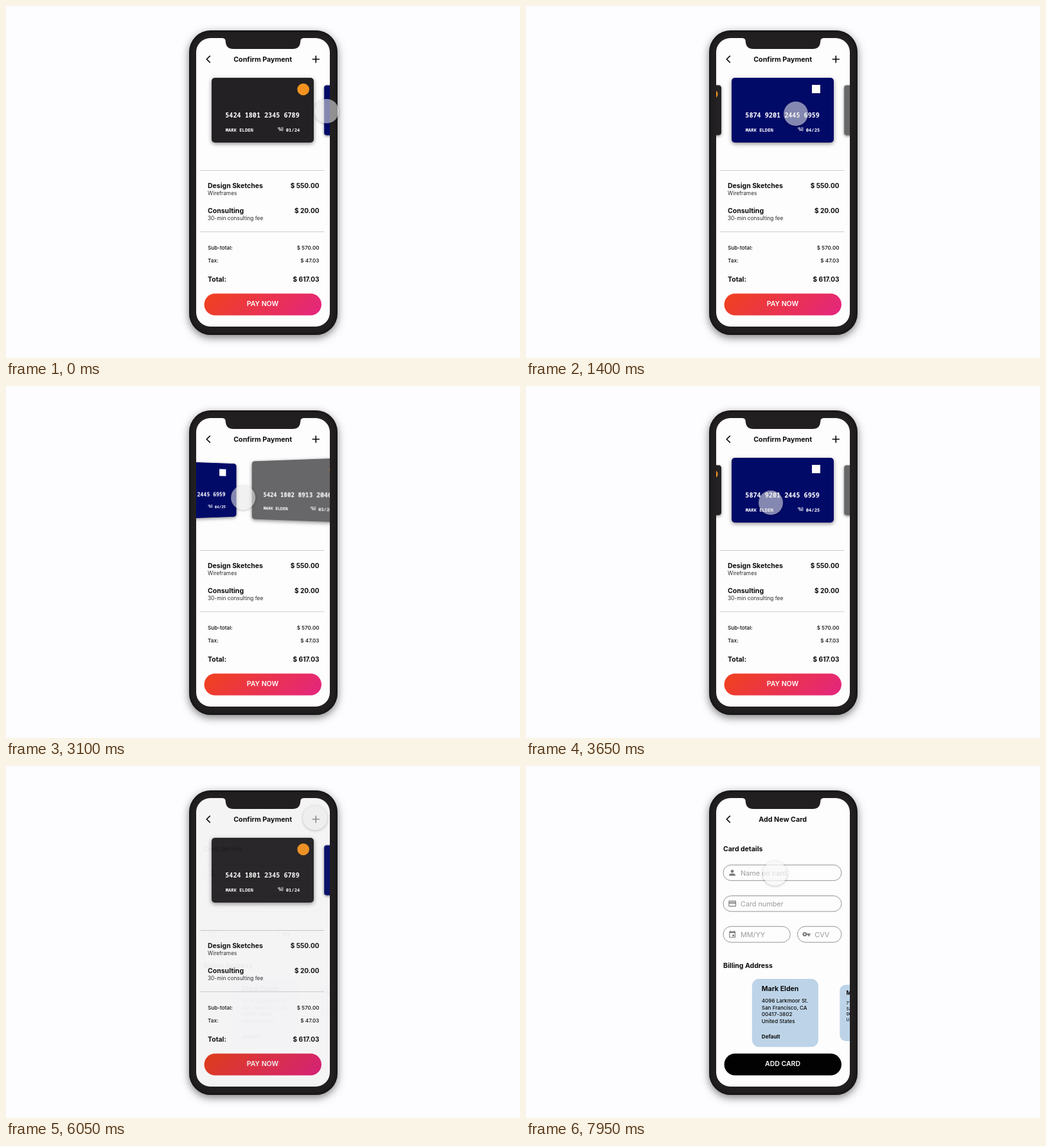
Write an HTML page that moves like this. It is 800 px wide and 549 px high and loops after 8000 ms.

```html
<!DOCTYPE html>
<html lang="en">
<head>
<meta charset="utf-8">
<title>Confirm Payment</title>
<style>
  html, body { margin: 0; width: 100%; height: 100%; overflow: hidden; background: #fdfcfe; }
  #stage { position: relative; width: 800px; height: 549px; overflow: hidden; }
  svg, .page { position: absolute; left: 0; top: 0; display: block; }
  .phone {
    position: absolute; left: 284.5px; top: 38px; width: 231.5px; height: 474.5px;
    border-radius: 34px; background: #221f21;
    box-shadow: 0 4px 13px rgba(0, 0, 0, .5), inset 0 0 5px 1px #100e10;
  }
  .screen {
    position: absolute; left: 296px; top: 50px; width: 208px; height: 450px;
    border-radius: 22px; overflow: hidden; background: #1b191b;
  }
  .page { width: 208px; height: 450px; background: #fefdfe; }
  text { font-family: Inter, "Open Sans", sans-serif; fill: #0b0b0b; }
  .title { font-size: 10.7px; font-weight: 700; text-anchor: middle; }
  .head { font-size: 10.5px; font-weight: 700; }
  .price { font-size: 10.1px; font-weight: 700; text-anchor: end; }
  .note { font-size: 8.3px; fill: #2a2a2a; }
  .row { font-size: 8.2px; font-weight: 500; }
  .end { text-anchor: end; }
  .button { font-size: 10.5px; font-weight: 600; text-anchor: middle; fill: #fff; }
  .hint { font-size: 10.8px; fill: #9a999b; }
  .small { font-size: 8.1px; font-weight: 500; }
  .bold { font-weight: 700; }
  .icon { fill: none; stroke: #0b0b0b; stroke-width: 1.7; stroke-linecap: round; stroke-linejoin: round; }
  .rule { stroke: #cbcacc; }
  .field { fill: none; stroke: #89888a; stroke-width: .9; }
  .glyph { fill: #7b7a7c; }
  .card {
    position: absolute; left: 24px; top: 62px; width: 159px; height: 101px;
    border-radius: 5px; box-shadow: 0 2px 6px rgba(0, 0, 0, .45);
  }
  .card text { font-family: "Noto Sans Mono", "DejaVu Sans Mono", monospace; font-weight: 600; fill: #fff; }
  .number { font-size: 10.15px; }
  .owner { font-size: 7.2px; }
  .valid { font-size: 2.9px; }
  #touch {
    position: absolute; left: -19px; top: -19px; width: 38px; height: 38px; border-radius: 50%;
    box-shadow: 0 1px 4px rgba(0, 0, 0, .24);
  }
</style>
</head>
<body>
<div id="stage">
  <div class="phone"></div>

  <div class="screen">
    <div class="page" id="pay">
      <svg width="208" height="450" viewBox="296 50 208 450">
        <defs>
          <linearGradient id="warm" gradientUnits="userSpaceOnUse" x1="350" y1="415" x2="449" y2="515">
            <stop offset="0" stop-color="#f0411f"/>
            <stop offset="1" stop-color="#e4267c"/>
          </linearGradient>
        </defs>
        <path class="icon" d="M317.3 78.2L312.2 83L317.3 87.8M477.3 83H487.3M482.3 78V88"/>
        <text class="title" x="399.7" y="86.7">Confirm Payment</text>
        <path class="rule" d="M301.5 256.5H495.5M301.5 352H495.5"/>
        <text class="head" x="314" y="283.8">Design Sketches</text>
        <text class="note" x="314" y="294.6">Wireframes</text>
        <text class="price" x="487.5" y="283.8">$ 550.00</text>
        <text class="head" x="314" y="322.8">Consulting</text>
        <text class="note" x="314" y="333.6">30-min consulting fee</text>
        <text class="price" x="487.5" y="322.8">$ 20.00</text>
        <text class="row" x="314" y="380.3">Sub-total:</text>
        <text class="row end" x="487.5" y="380.3">$ 570.00</text>
        <text class="row" x="314" y="400.3">Tax:</text>
        <text class="row end" x="487.5" y="400.3">$ 47.03</text>
        <text class="head" x="314" y="430.2">Total:</text>
        <text class="price" x="487.5" y="430.2">$ 617.03</text>
        <rect x="308.5" y="448.5" width="182.5" height="34" rx="17" fill="url(#warm)"/>
        <text class="button" x="399.5" y="468.3">PAY NOW</text>
      </svg>
    </div>

    <div class="page" id="add">
      <svg width="208" height="450" viewBox="296 50 208 450">
        <path class="icon" d="M317.3 78.2L312.2 83L317.3 87.8"/>
        <text class="title" x="399.7" y="86.7">Add New Card</text>
        <text class="head" x="307" y="133">Card details</text>
        <rect class="field" x="307" y="154.3" width="184" height="24.4" rx="12.2"/>
        <rect class="field" x="307" y="202.5" width="184" height="24.4" rx="12.2"/>
        <rect class="field" x="307" y="250.2" width="104.3" height="24.8" rx="12.4"/>
        <rect class="field" x="422.5" y="250.2" width="68.5" height="24.8" rx="12.4"/>
        <text class="hint" x="334" y="170.7">Name on card</text>
        <text class="hint" x="334" y="219">Card number</text>
        <text class="hint" x="334" y="266.5">MM/YY</text>
        <text class="hint" x="449.3" y="266.5">CVV</text>
        <g class="glyph" fill-rule="evenodd">
          <circle cx="321" cy="164.2" r="2.4"/>
          <path d="M316.2 171.2V170C316.2 166.8 325.8 166.8 325.8 170V171.2Z"/>
          <path d="M316.5 210H325.8Q327 210 327 211.2V218Q327 219.2 325.8 219.2H316.5Q315.3 219.2 315.3 218V211.2Q315.3 210 316.5 210ZM316.4 211.2V212.4H325.9V211.2ZM316.4 214.5V218.1H325.9V214.5Z"/>
          <path d="M316.2 258H317.8V256.8H319V258H323.2V256.8H324.4V258H326V267.8H316.2ZM317.3 260.6V266.7H324.9V260.6ZM321.2 263H324V265.8H321.2Z"/>
          <path d="M433.8 258.9A3.4 3.4 0 0 1 437 261.2H442.6V263.5H441.4V265.6H439V263.5H437A3.4 3.4 0 1 1 433.8 258.9ZM433.8 261.1A1.2 1.2 0 1 0 433.8 263.5A1.2 1.2 0 1 0 433.8 261.1Z"/>
        </g>
        <text class="head" x="307" y="315.4">Billing Address</text>
        <g id="address">
          <rect x="351.8" y="332" width="103.2" height="106.3" rx="11" fill="#bdd4e8"/>
          <text class="head" x="366.8" y="351.4">Mark Elden</text>
          <text class="small" x="366.8" y="368.8">4096 Larkmoor St.</text>
          <text class="small" x="366.8" y="379.8">San Francisco, CA</text>
          <text class="small" x="366.8" y="390.4">00417-3802</text>
          <text class="small" x="366.8" y="401.2">United States</text>
          <text class="small bold" x="366.8" y="425.3">Default</text>
        </g>
        <g transform="translate(488.4 341.2) scale(.826)">
          <rect width="103.2" height="106.3" rx="11" fill="#bdd4e8"/>
          <text class="head" x="12.3" y="19.4">Mark Elden</text>
          <text class="small" x="12.3" y="36.8">71 Fenwold Ave.</text>
          <text class="small" x="12.3" y="47.8">San Francisco, CA</text>
          <text class="small" x="12.3" y="58.4">00418-1175</text>
          <text class="small" x="12.3" y="69.2">United States</text>
        </g>
        <rect x="308.5" y="448.5" width="182.5" height="34" rx="17" fill="#020203"/>
        <text class="button" x="399.5" y="468.3">ADD CARD</text>
      </svg>
    </div>
  </div>

  <svg width="800" height="549">
    <path fill="#221f21" d="M337 49H463V50Q458.5 50.5 458.3 54.5Q458 67 446 67H354Q342 67 341.7 54.5Q341.5 50.5 337 50Z"/>
  </svg>
  <div id="touch"></div>
</div>

<script>
  const LOOP = 8000;
  const STEP = 157;    // distance between neighbouring cards
  const SHRINK = 0.228; // size lost by a card at the side

  const circle = '<circle cx="142.7" cy="18" r="9.3" fill="#f4921f"/>';
  const square = '<rect x="125" y="11" width="13" height="13" fill="#fff"/>';
  const cardData = [
    { color: '#232123', number: '5424 1801 2345 6789', date: '01/24', badge: circle },
    { color: '#020a68', number: '5874 9201 2445 6959', date: '04/25', badge: square },
    { color: '#676668', number: '5424 1802 8913 2046', date: '03/26', badge: circle }
  ];

  // Keys are [time, ...values]
  const position = [
    [0, 0], [725, 0], [1325, 1], [2100, 1], [2730, 2],
    [2880, 2], [3450, 1], [3780, 1], [4320, 0]
  ];
  const finger = [
    [0, 499, 164], [600, 497, 164], [1200, 418, 169], [1400, 420, 168],
    [2050, 440, 160], [2700, 350, 169], [2900, 350, 172], [3400, 404, 178],
    [3650, 381, 182], [3780, 378, 182], [4300, 436, 160], [4680, 440, 153],
    [5150, 481, 81], [6750, 481, 81], [7650, 387.5, 167.5]
  ];
  const dissolve = [[0, 0], [6000, 0], [6450, 1]];

  const pay = document.getElementById('pay');
  const add = document.getElementById('add');
  const touch = document.getElementById('touch');
  const cards = cardData.map(makeCard);

  function makeCard({ color, number, date, badge }) {
    const el = document.createElement('div');
    el.className = 'card';
    el.style.background = color;
    el.innerHTML = `<svg width="159" height="101">${badge}
      <text class="number" x="21.3" y="61.7">${number}</text>
      <text class="owner" x="21.7" y="84.3">MARK ELDEN</text>
      <text class="valid end" x="111.5" y="79.6">VALID</text>
      <text class="valid end" x="111.5" y="83">THRU</text>
      <text class="owner end" x="137.3" y="84.3">${date}</text></svg>`;
    pay.appendChild(el);
    return el;
  }

  const smooth = u => u * u * (3 - 2 * u);

  function track(keys, t) {
    const next = keys.findIndex(key => key[0] > t);
    if (next < 0) return keys[keys.length - 1].slice(1);
    const a = keys[next - 1], b = keys[next];
    const k = smooth((t - a[0]) / (b[0] - a[0]));
    return a.slice(1).map((v, i) => v + (b[i + 1] - v) * k);
  }

  function placeCard(el, offset) {
    const far = Math.min(1, Math.abs(offset));
    const scale = 1 - SHRINK * Math.pow(far, 1.25);
    const tilt = -Math.sign(offset) * 14 * Math.sin(Math.PI * far);
    el.style.transform =
      `translateX(${offset * STEP}px) scale(${scale}) perspective(300px) rotateY(${tilt}deg)`;
  }

  function draw(t) {
    const [pos] = track(position, t);
    cards.forEach((el, i) => placeCard(el, i - pos));

    const [mix] = track(dissolve, t);
    pay.style.opacity = 1 - mix;
    add.style.opacity = mix;

    const [x, y] = track(finger, t);
    const tone = 232 + 16 * mix;
    touch.style.transform = `translate(${x}px, ${y}px)`;
    touch.style.background = `rgba(${tone}, ${tone}, ${tone}, ${0.57 + 0.13 * mix})`;
  }

  const start = performance.now();
  function frame() {
    draw((performance.now() - start) % LOOP);
    requestAnimationFrame(frame);
  }
  frame();
</script>
</body>
</html>
```
